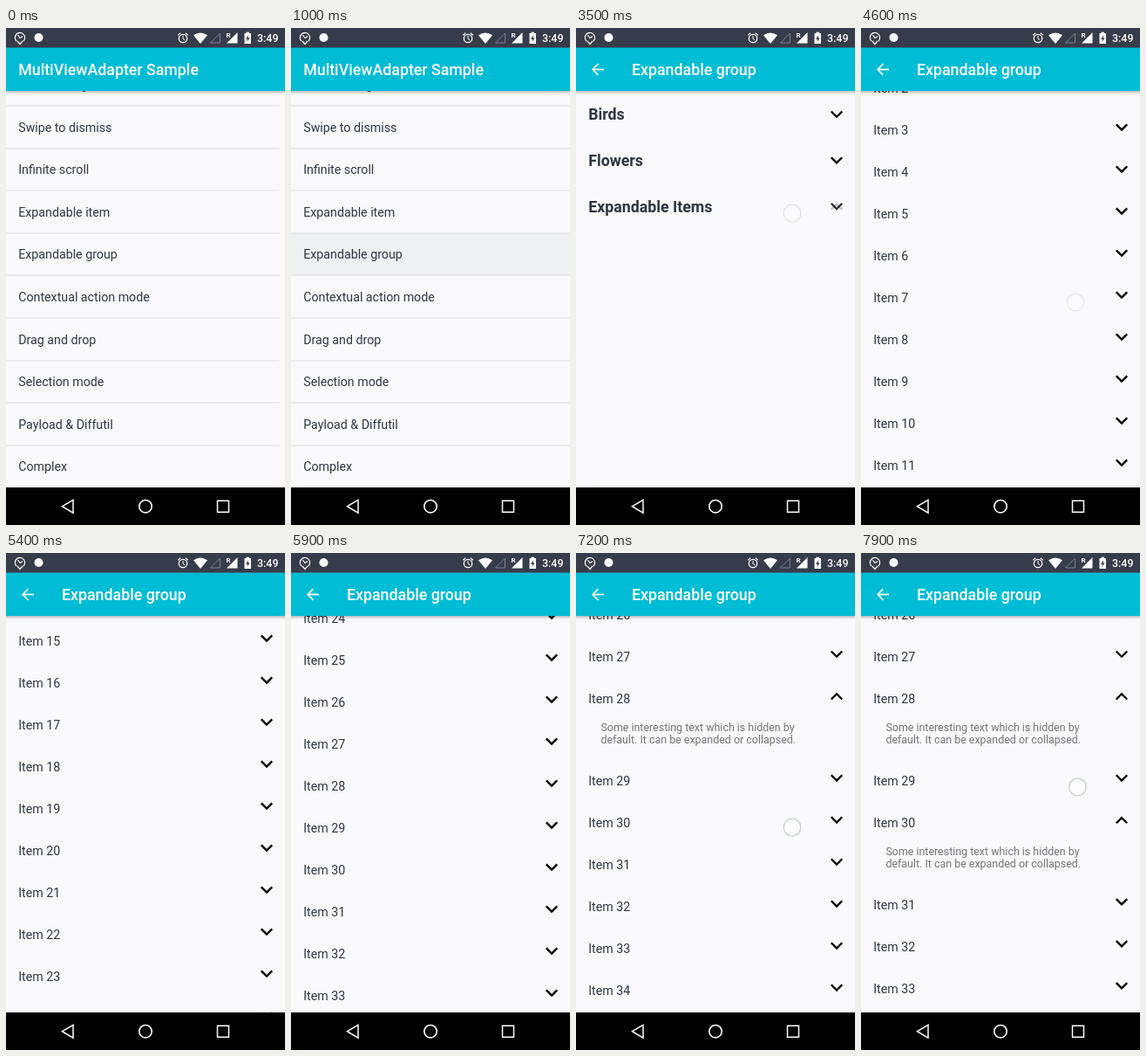
Animation of 320x569 px, one loop 8 s. Source, as an HTML page with a canvas:

```html
<!DOCTYPE html>
<html lang="en">
<head>
<meta charset="utf-8">
<title>Expandable group demo</title>
<style>
  html, body { margin: 0; width: 100%; height: 100%; overflow: hidden; background: #000; }
  canvas { display: block; width: 100%; height: 100%; }
</style>
</head>
<body>
<canvas id="stage"></canvas>
<script>
const W = 320, H = 569, LOOP = 8000;
const BAR_BOTTOM = 72, NAV_TOP = 526;
const INK = '#2f3542', PAPER = '#faf9fc', CYAN = '#00bcd4', WHITE = '#fff';
const BODY = '14.22px Roboto, sans-serif';
const TITLE = '500 17.78px Roboto, sans-serif';
const GROUP = 'bold 17.78px Roboto, sans-serif';
const SMALL = '12.44px Roboto, sans-serif';

const canvas = document.getElementById('stage');
const ctx = canvas.getContext('2d');
const ratio = window.devicePixelRatio || 1;
canvas.width = W * ratio;
canvas.height = H * ratio;
ctx.scale(ratio, ratio);

const progress = (t, from, to) => Math.min(1, Math.max(0, (t - from) / (to - from)));
const easeOut = (u, power = 2) => 1 - (1 - u) ** power;
const easeInOut = u => (1 - Math.cos(Math.PI * u)) / 2;

function withAlpha(alpha, draw) {
  if (alpha <= 0) return;
  ctx.save();
  ctx.globalAlpha *= alpha;
  draw();
  ctx.restore();
}

function rect(x, y, w, h, color) {
  ctx.fillStyle = color;
  ctx.fillRect(x, y, w, h);
}

function text(string, x, baseline, font, color = INK) {
  ctx.font = font;
  ctx.fillStyle = color;
  ctx.fillText(string, x, baseline);
}

function trace(points, closed) {
  ctx.beginPath();
  points.forEach(([x, y]) => ctx.lineTo(x, y));
  if (closed) ctx.closePath();
}

function line(points, color, width, closed = false) {
  trace(points, closed);
  ctx.strokeStyle = color;
  ctx.lineWidth = width;
  ctx.stroke();
}

function shape(points, color) {
  trace(points, true);
  ctx.fillStyle = color;
  ctx.fill();
}

function circle(x, y, r, fill, stroke, width = 1) {
  ctx.beginPath();
  ctx.arc(x, y, r, 0, 2 * Math.PI);
  if (fill) { ctx.fillStyle = fill; ctx.fill(); }
  if (stroke) { ctx.strokeStyle = stroke; ctx.lineWidth = width; ctx.stroke(); }
}

// Cross-fades from the "closed" to the "open" chevron.
function chevron(y, open) {
  const draw = dir => line([[292.8, y - 3.5 * dir], [299, y + 2.7 * dir], [305.2, y - 3.5 * dir]], '#000', 2.33);
  withAlpha(1 - open, () => draw(1));
  withAlpha(open, () => draw(-1));
}

function touch(t, down, up, x, y) {
  if (t < down) return;
  withAlpha(1 - progress(t, up, up + 100), () =>
    circle(x, y, 9.8, 'rgba(255,255,255,.5)', '#c6ced3', 1.3));
}

function toolbar(title, x) {
  const shadow = ctx.createLinearGradient(0, BAR_BOTTOM, 0, BAR_BOTTOM + 4);
  shadow.addColorStop(0, 'rgba(0,0,0,.25)');
  shadow.addColorStop(1, 'rgba(0,0,0,0)');
  rect(0, BAR_BOTTOM, W, 4, shadow);
  rect(0, 22, W, BAR_BOTTOM - 22, CYAN);
  text(title, x, 54, TITLE, WHITE);
}

function statusBar() {
  rect(0, 0, W, 22.5, '#373c4b');
  // Notification icons
  ctx.beginPath();
  ctx.arc(16, 11, 5.6, 2.3, 7.1);
  ctx.strokeStyle = WHITE;
  ctx.lineWidth = 1.2;
  ctx.stroke();
  line([[13.5, 8], [16, 11.5], [19, 9.5]], WHITE, 1.2);
  line([[13, 15], [16, 18.5], [19, 15]], WHITE, 1.2);
  circle(37.5, 11, 5, WHITE);
  // Alarm
  circle(203, 12, 4.7, null, WHITE, 1.3);
  line([[203, 9], [203, 12.4], [205.3, 13.8]], WHITE, 1);
  line([[197.2, 8.3], [200.2, 5.8]], WHITE, 1.3);
  line([[208.8, 8.3], [205.8, 5.8]], WHITE, 1.3);
  // Wi-Fi
  ctx.beginPath();
  ctx.moveTo(223, 18);
  ctx.lineTo(215, 8.3);
  ctx.quadraticCurveTo(223, 2.7, 231, 8.3);
  ctx.fillStyle = WHITE;
  ctx.fill();
  // Mobile signals
  line([[234.5, 17], [245.5, 17], [245.5, 6]], '#7b808b', 1, true);
  shape([[253, 17.6], [265.5, 17.6], [265.5, 5]], WHITE);
  rect(251.5, 3.5, 6.5, 8.5, '#373c4b');
  text('R', 252.5, 10.5, 'bold 8px Roboto, sans-serif', WHITE);
  // Battery
  rect(273.5, 6, 7.5, 12, WHITE);
  rect(275.5, 4.7, 3.5, 2, WHITE);
  shape([[278, 8], [275, 12.7], [277, 12.7], [276.5, 16], [279.6, 11.3], [277.6, 11.3]], '#373c4b');
  text('3:49', 288, 16.3, '500 12.44px Roboto, sans-serif', WHITE);
}

function navigationBar() {
  rect(0, NAV_TOP, W, H - NAV_TOP, '#000');
  line([[64.5, 547.7], [77, 540.3], [77, 555.1]], WHITE, 1.5, true);
  circle(160, 547.7, 7.2, null, WHITE, 1.6);
  line([[242.5, 541.3], [255.5, 541.3], [255.5, 554.3], [242.5, 554.3]], WHITE, 1.5, true);
}

const SAMPLES = ['Data binding', 'Swipe to dismiss', 'Infinite scroll', 'Expandable item',
  'Expandable group', 'Contextual action mode', 'Drag and drop', 'Selection mode',
  'Payload & Diffutil', 'Complex'];

function sampleScreen(t) {
  rect(0, 22, W, NAV_TOP - 22, PAPER);
  const pitch = 48.6, top = i => 89 + (i - 1) * pitch;

  const pressed = progress(t, 700, 900) * (1 - progress(t, 1080, 1350));
  withAlpha(pressed, () => rect(0, top(4), W, pitch, '#eff0f2'));

  SAMPLES.forEach((name, i) => {
    text(name, 14.2, top(i) + 29.6, BODY);
    rect(0, Math.round(top(i)) - .5, W, 1, '#dfdfe3');
  });
  withAlpha(1 - progress(t, 480, 620), () => rect(313.5, BAR_BOTTOM, 6.5, NAV_TOP - BAR_BOTTOM, '#fcf8fb'));
  touch(t, 600, 850, 248, 261);
  toolbar('MultiViewAdapter Sample', 14.2);
}

const ITEM_PITCH = 48, DETAIL_HEIGHT = 45.8, ITEM_COUNT = 35;

// Two drags, each followed by a fling; the second one hits the end of the list.
function scrollAt(t) {
  if (t < 4600) return 233 * progress(t, 4350, 4600) ** 1.4;
  if (t < 5400) return 233 + 593 * easeOut(progress(t, 4600, 5400), 1.6);
  if (t < 5650) return 826 + 190 * progress(t, 5400, 5650) ** 1.4;
  return 1016 + 368 * easeOut(progress(t, 5650, 6020), 1.15);
}

function itemRow(n, y, open) {
  text('Item ' + n, 14.2, y + 5, BODY);
  chevron(y - 3, open);
  withAlpha(open, () => {
    text('Some interesting text which is hidden by', 28.4, y + 37.2, SMALL, '#737378');
    text('default. It can be expanded or collapsed.', 28.4, y + 51.4, SMALL, '#737378');
  });
}

function edgeGlow(t) {
  const size = progress(t, 5980, 6130) * (1 - progress(t, 6150, 6850)) / .79;
  if (!size) return;
  ctx.beginPath();
  ctx.moveTo(0, NAV_TOP);
  ctx.lineTo(0, NAV_TOP - 8 * size);
  ctx.quadraticCurveTo(155, NAV_TOP - 20 * size, W, NAV_TOP - 8 * size);
  ctx.lineTo(W, NAV_TOP);
  ctx.fillStyle = `rgba(0,170,205,${.09 * size})`;
  ctx.fill();
}

function groupScreen(t) {
  rect(0, 22, W, NAV_TOP - 22, PAPER);
  const scroll = scrollAt(t);
  const groupOpen = progress(t, 3460, 3660);
  const itemsShown = progress(t, 3640, 3780);
  const details = {
    28: easeInOut(progress(t, 6650, 6900)),
    30: easeInOut(progress(t, 7250, 7520))
  };

  ['Birds', 'Flowers', 'Expandable Items'].forEach((name, i) => {
    const y = 99 + 52.7 * i - scroll;
    text(name, 14.2, y + 6.4, GROUP);
    chevron(y, i === 2 ? groupOpen : 0);
  });

  withAlpha(itemsShown, () => {
    let y = 207 - scroll;
    for (let n = 1; n <= ITEM_COUNT; n++) {
      y += ITEM_PITCH;
      const open = details[n] || 0;
      if (y > 0 && y < NAV_TOP + 20) itemRow(n, y, open);
      y += DETAIL_HEIGHT * open;
    }
  });

  edgeGlow(t);
  touch(t, 3400, 3460, 248, 212);
  touch(t, 4380, 4540, 246, 314 + Math.max(0, 147 - scroll));
  touch(t, 5450, 5590, 246, 314 + Math.max(0, 930 - scroll));
  touch(t, 6550, 6640, 248, 173);
  touch(t, 7150, 7240, 248, 314);
  touch(t, 7890, LOOP, 248.5, 268);

  toolbar('Expandable group', 64);
  line([[32, 47.5], [20, 47.5]], WHITE, 1.75);
  line([[25.4, 41.2], [19.2, 47.5], [25.4, 53.8]], WHITE, 1.75);
}

function render(t) {
  if (t < 1620) sampleScreen(t);
  if (t >= 1400) {
    withAlpha(easeOut(progress(t, 1380, 1600)), () => {
      ctx.translate(0, 40 * (1 - easeOut(progress(t, 1380, 1760), 3)));
      groupScreen(t);
    });
  }
  statusBar();
  navigationBar();
}

const start = performance.now();
function tick() {
  render((performance.now() - start) % LOOP);
  requestAnimationFrame(tick);
}
tick();
</script>
</body>
</html>
```
